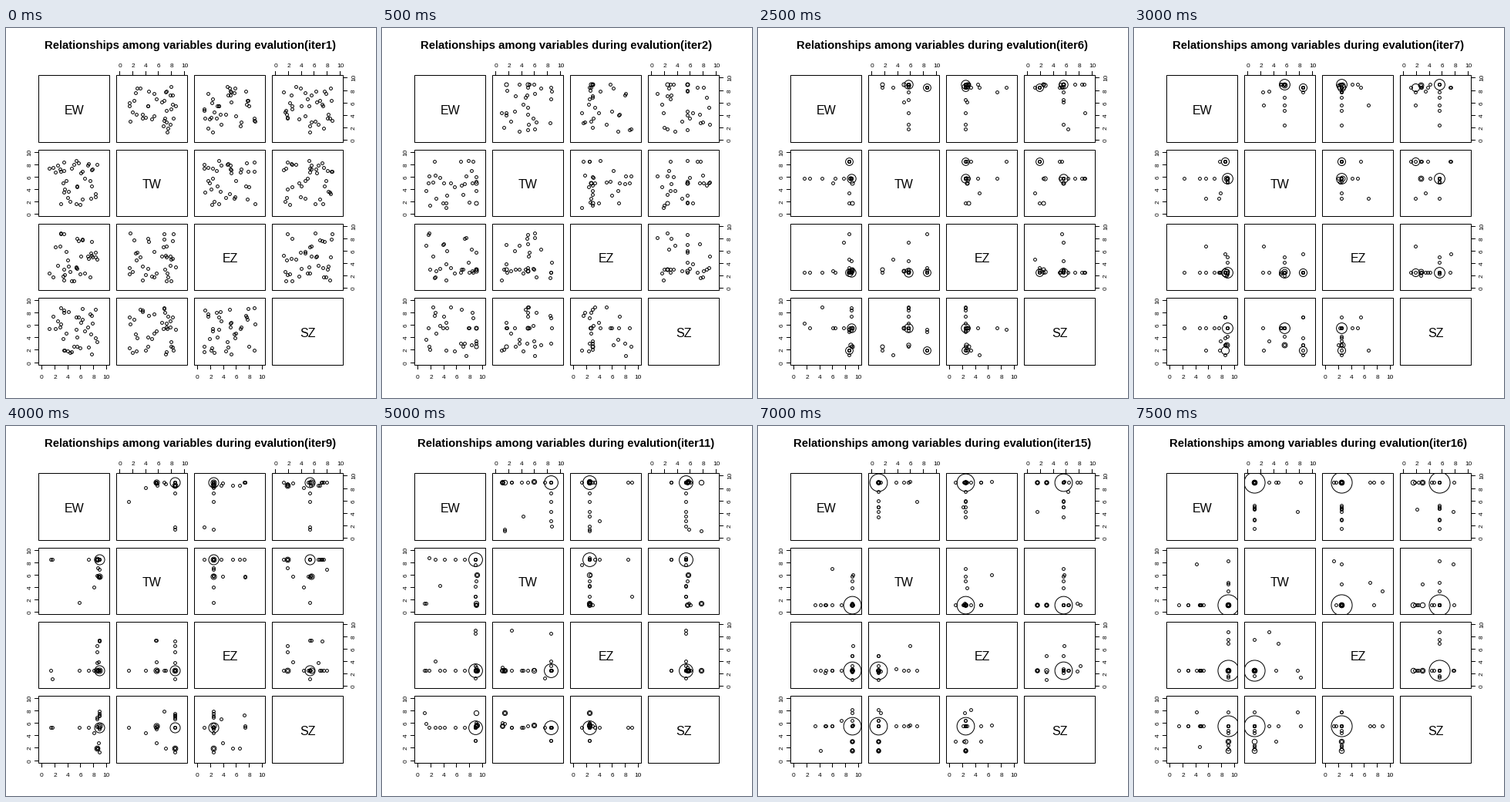
Write a matplotlib script that moves like this. It is 480x480 px and loops after 8 s.

```python
import math
import random

import matplotlib.pyplot as plt
from matplotlib.animation import FuncAnimation
from matplotlib.patches import Rectangle

SIZE, DPI = 480, 100
PT = 72 / DPI                      # points per pixel
NAMES = ["EW", "TW", "EZ", "SZ"]
LAST = 16
DOT = 1.9                          # radius of a single individual

LINE = 9.504                       # height of one margin line
PITCH_X = (SIZE - 8 * LINE) / 4
PITCH_Y = (SIZE - 10 * LINE) / 4
PANEL_W, PANEL_H = PITCH_X - LINE, PITCH_Y - LINE

# Successful genotypes: position, peak generation, growth at peak, time spread
BREEDS = [
    ((9.0, 5.0, 2.8, 5.6), 4, 3.7, 1.5),
    ((9.0, 1.7, 3.0, 2.5), 4, 3.5, 1.5),
    ((8.5, 8.5, 2.5, 1.9), 6.7, 3.2, 2.6),
    ((8.9, 5.7, 2.5, 5.6), 7, 5.0, 1.9),
    ((8.8, 5.7, 2.6, 2.8), 7, 1.5, 1.2),
    ((8.9, 8.5, 2.5, 5.3), 10.3, 8.3, 1.7),
    ((9.1, 6.0, 2.5, 5.7), 12, 1.6, 1.9),
    ((9.0, 1.4, 2.5, 7.7), 12, 1.6, 1.9),
    ((9.0, 1.1, 2.5, 5.6), 17, 12.5, 3.8),
    ((9.0, 1.1, 2.5, 3.0), 16, 1.3, 1.5),
    ((9.0, 1.1, 2.5, 1.6), 16, 1.3, 1.5),
]


def left(col):
    return 4.5 * LINE + col * PITCH_X


def top(row):
    return 6.5 * LINE + row * PITCH_Y


def px(col, v):
    return int(left(col) + PANEL_W * (v + 0.4) / 10.8)


def py(row, v):
    return int(top(row) + PANEL_H * (10.4 - v) / 10.8)


def mutate(parent, rate, rng):
    """Reroll one gene for sure and each other one at the given rate."""
    sure = rng.randrange(4)
    return [rng.uniform(1, 9) if i == sure or rng.random() < rate else gene
            for i, gene in enumerate(parent)]


def population(n):
    """Individuals of generation n as (genes, radius)."""
    rng = random.Random(n)
    growth = [g * math.exp(-((n - peak) / spread) ** 2)
              for _, peak, g, spread in BREEDS]
    genes = [b[0] for b in BREEDS]
    people = [(p, DOT + g) for p, g in zip(genes, growth) if g > 0.5]
    rate = 0.06 + 0.94 * math.exp((1 - n) / 2.2)
    count = round(20 + 18 * math.exp((1 - n) / 1.5))
    for parent in rng.choices(genes, growth, k=count):
        people.append((mutate(parent, rate, rng), DOT))
    return people


fig = plt.figure(figsize=(SIZE / DPI, SIZE / DPI), dpi=DPI, facecolor="white")
ax = fig.add_axes([0, 0, 1, 1])
ax.set(xlim=(0, SIZE), ylim=(SIZE, 0))
ax.axis("off")


def label(x, y, s, size, **kw):
    kw = {"ha": "center", "va": "center_baseline", **kw}
    return ax.text(x, y, s, fontsize=size * PT, family="Liberation Sans",
                   rotation_mode="anchor", **kw)


def stroke(xs, ys):
    ax.plot(xs, ys, color="black", lw=PT, snap=True)


def draw_axes():
    x0, x1, y0, y1 = 42, 437, 61, 437
    for i in range(4):
        for v in range(0, 11, 2):
            x, y = px(i, v), py(i, v)
            if i % 2:
                stroke([x, x], [y0, y0 - 5])
                label(x + 0.5, 48.5, v, 8.3)
                stroke([x0, x0 - 5], [y, y])
                label(30, y + 0.5, v, 8.3, rotation=90)
            else:
                stroke([x, x], [y1, y1 + 5])
                label(x + 0.5, 452.5, v, 8.3)
                stroke([x1, x1 + 5], [y, y])
                label(450.5, y + 0.5, v, 8.3, rotation=90)


def draw_panels():
    clouds = {}
    for row in range(4):
        for col in range(4):
            x, y = int(left(col)), int(top(row))
            x2, y2 = int(left(col) + PANEL_W), int(top(row) + PANEL_H)
            box = ax.add_patch(Rectangle((x, y), x2 - x, y2 - y, fill=False,
                                         lw=PT, snap=True))
            if row == col:
                label((x + x2 + 1) / 2, (y + y2) / 2 + 1.5, NAMES[row], 16)
                continue
            cloud = ax.scatter([], [], facecolors="none", edgecolors="black",
                               linewidths=PT)
            cloud.set_clip_path(box)
            clouds[row, col] = cloud
    return clouds


draw_axes()
clouds = draw_panels()
title = label(239, 27, "", 14.85, weight="bold", va="baseline")


def update(i):
    people = population(i + 1)
    areas = [(2 * r * PT) ** 2 for _, r in people]
    for (row, col), cloud in clouds.items():
        cloud.set_offsets([(px(col, p[col]) + 0.5, py(row, p[row]) + 0.5)
                           for p, _ in people])
        cloud.set_sizes(areas, fig.dpi)
    title.set_text(f"Relationships among variables during evalution(iter{i + 1})")
    return [title, *clouds.values()]


anim = FuncAnimation(fig, update, frames=LAST, interval=500, repeat=True,
                     repeat_delay=0)
plt.show()
```
